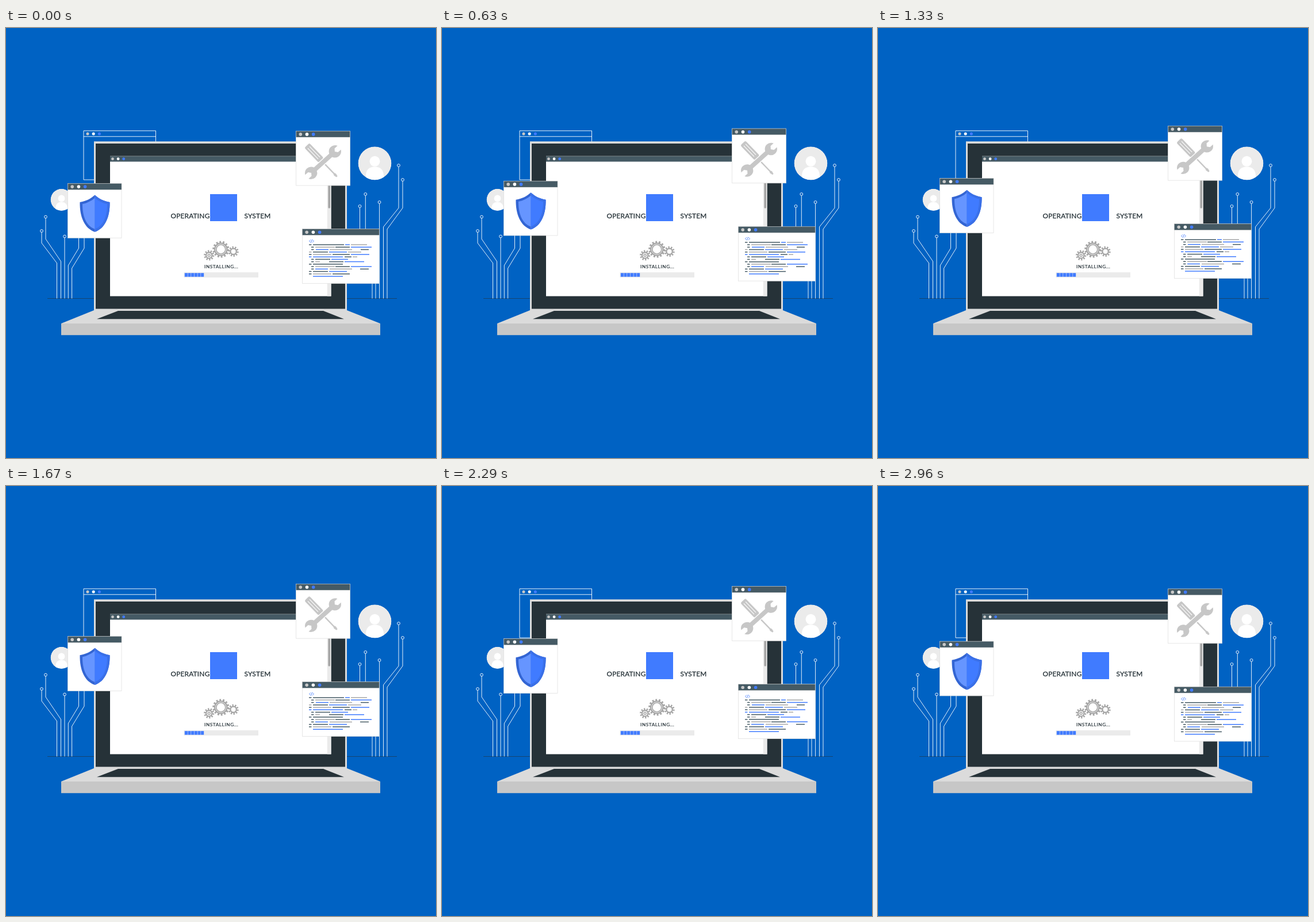
An HTML page for the animation above (3 s loop, 748 by 748 pixels).

```html
<!DOCTYPE html>
<html lang="en">
<head>
<meta charset="utf-8">
<title>Installing</title>
<style>
html, body { margin: 0; width: 100%; height: 100%; overflow: hidden; background: #0062c3; }
svg { display: block; width: 748px; height: 748px; }
text { font-family: Lato, sans-serif; fill: #263238; }
.line { fill: none; stroke: #fff; stroke-width: .9; }
</style>
</head>
<body>
<svg viewBox="0 0 748 748">
  <defs>
    <clipPath id="face"><circle r="29"/></clipPath>
    <g id="avatar" clip-path="url(#face)">
      <circle r="29" fill="#ebebeb"/>
      <circle cy="-3.5" r="9" fill="#fff"/>
      <path d="M-15.5 32V22C-15.5 11-9 6 0 6S15.5 11 15.5 22V32Z" fill="#fff"/>
    </g>
    <g id="dots"><circle r="1" fill="#c7c7c7"/><circle cx="4" r="1" fill="#fff"/><circle cx="8" r="1" fill="#407bff"/></g>
  </defs>

  <path d="M72 470.5H680" stroke="#263238" stroke-width=".6"/>
  <g id="circuits" class="line"></g>
  <path class="line" stroke-width="1" d="M135 178.8H260.5V264H135ZM135 188.8H260.5"/>
  <use href="#dots" transform="translate(142 184) scale(2.55)"/>
  <use href="#avatar" x="641.5" y="235.3"/>
  <use href="#avatar" transform="translate(96.5 298.8) scale(.655)"/>

  <!-- laptop -->
  <path d="M153 197.3H593V491H153Z" fill="#dbdbdb"/>
  <path d="M156 201H590V488.5H156Z" fill="#263238"/>
  <path d="M153 491H593L651 514H96Z" fill="#dbdbdb"/>
  <path d="M96 514H651V534.3H96Z" fill="#c7c7c7"/>
  <path d="M195 492H552L588 506.2H158Z" fill="#263238"/>
  <path d="M181 223H565.5V466.5H181Z" fill="#fff"/>
  <path d="M181 223H565.5V232.5H181Z" fill="#455a64"/>
  <path d="M181 222.8H565.5" stroke="#c7c7c7" stroke-width=".5"/>
  <use href="#dots" transform="translate(185.5 227.7) scale(2.4)"/>
  <path d="M558.8 232.5H565.5V466.5H558.8Z" fill="#ebebeb"/>
  <path d="M562.2 240V312" stroke="#a6a6a6" stroke-width="3.6" stroke-linecap="round"/>

  <!-- screen content -->
  <rect x="355" y="289" width="47" height="47" fill="#407bff"/>
  <g font-size="11.8" letter-spacing=".25" style="stroke:#263238;stroke-width:.3">
    <text x="354.5" y="331" text-anchor="end">OPERATING</text>
    <text x="414.5" y="331">SYSTEM</text>
  </g>
  <text x="345" y="417.8" font-size="8.2" letter-spacing=".6" style="stroke:#263238;stroke-width:.2">INSTALLING...</text>
  <g id="gears"></g>
  <path d="M309.5 425H439V434H309.5Z" fill="#ebebeb"/>
  <path d="M310.8 429.5H344.2" stroke="#407bff" stroke-width="6.6" stroke-dasharray="5.1 .56"/>

  <!-- floating windows -->
  <g id="float">
    <g id="frames"></g>

    <g transform="translate(551.5 233.5)" fill="#c7c7c7">
      <g transform="rotate(46)">
        <path d="M-38-6H-7Q-2-4 0-1.5V1.5Q-2 4-7 6H-38Q-40.500 6-40.500 3.500V-3.500Q-40.500-6-38-6Z"/>
        <path d="M-36-2.200H-10M-36 2.200H-10" stroke="#fff" stroke-width="1.100"/>
        <path d="M-3-1.200H27L30-2.400 35-1.200V1.200L30 2.400 27 1.200H-3Z"/>
      </g>
      <g transform="rotate(-42)">
        <path d="M-21 0H21" stroke="#fff" stroke-width="10.500"/>
        <path d="M-23 0H23" stroke="#c7c7c7" stroke-width="7.800"/>
        <circle cx="-28" r="10.700"/>
        <circle cx="28" r="10.700"/>
        <path d="M-41-4.500H-31L-27.500 0-31 4.500H-41ZM41-4.500H31L27.500 0 31 4.500H41Z" fill="#fff"/>
      </g>
    </g>

    <g transform="translate(154.5 290.5)">
      <path id="half" d="M0 0C-7 6.500-16 11-26 12.500C-26.500 38-18 58 0 64.300Z" fill="#3365d3"/>
      <use href="#half" transform="scale(-1 1)"/>
      <path d="M0 0C7 6.500 16 11 26 12.500C26.500 38 18 58 0 64.300Z" fill="#3a70e8"/>
      <path d="M0 5.200C-6.500 10.500-13 14-21.500 15.800C-21.500 37-15 54-0 59.300Z" fill="#6695ff"/>
      <path d="M0 5.200C6.500 10.500 13 14 21.500 15.800C21.500 37 15 54 0 59.300Z" fill="#407bff"/>
    </g>

    <path d="M530 368.300L527.500 370.700 530 373.100M533 368.300L535.500 370.700 533 373.100M532.200 367.800L530.800 373.600" fill="none" stroke="#407bff" stroke-width=".8"/>
    <g id="code"></g>
  </g>
</svg>

<script>
const byId = id => document.getElementById(id);

// Each trace starts at its hollow node.
byId("circuits").innerHTML = [
  [62, 353, "V374L88.5 409V470.5"],
  [69, 328.5, "V367L95.5 406V470.5"],
  [102, 362.5, "V470.5"],
  [126.5, 345, "V383L108.3 413V470.5"],
  [136, 340, "V383L114.6 418V470.5"],
  [683, 239, "V313L656.5 346V470.5"],
  [690, 264, "V313L663 350V470.5"],
  [625.3, 289, "V390L643 420V470.5"],
  [615.5, 310, "V390L637 424V470.5"],
  [649.6, 303, "V470.5"]
].map(([x, y, path]) => `<circle cx="${x}" cy="${y}" r="2.4"/><path d="M${x} ${y + 2.4}${path}"/>`).join("");

function gear(x, y, r, teeth, hole) {
  const step = 2 * Math.PI * (r - 1) / teeth;
  return `<g transform="translate(${x} ${y})" fill="none" stroke="#a6a6a6">
    <circle r="${r - 1}" stroke-width="3.6" stroke-dasharray="${step * .5} ${step * .5}"/>
    <circle r="${(r - 2 + hole) / 2}" stroke-width="${r - 2 - hole}"/></g>`;
}
byId("gears").innerHTML =
  gear(373.8, 385, 13.8, 14, 7.2) +
  '<circle cx="373.8" cy="385" r="9.2" fill="none" stroke="#fff" stroke-width=".8"/>' +
  gear(353.2, 395.4, 8.3, 10, 4) + 
  '<circle cx="353.2" cy="395.4" r="2" fill="none" stroke="#a6a6a6" stroke-width="1.5"/>' +
  gear(395.6, 388.8, 8.3, 10, 4);

const panel = (x, y, w) => `
  <rect x="${x}" y="${y}" width="${w}" height="94.7" fill="#fff" stroke="#e0e0e0" stroke-width=".8"/>
  <rect x="${x}" y="${y}" width="${w}" height="10.7" fill="#455a64" stroke="#c7c7c7" stroke-width=".4"/>
  <use href="#dots" transform="translate(${x + 7.7} ${y + 5.6}) scale(2.8)"/>`;
byId("frames").innerHTML = panel(504.6, 179.3, 93.8) + panel(107.5, 270.5, 93.5) + panel(515.5, 349.6, 133.7);

// Rows of strokes: colour letter, start and end; the first letter is the short lead.
const inks = { d: "#455a64", g: "#a6a6a6", b: "#407bff" };
const rows = [
  "d527 d534-588 b590-598 g600-628",
  "d531 g538-572 d573-598 b600-636",
  "d531 b539-561 g563-602 d617-631",
  "g527 d534-560 b562-593 g595-618",
  "d527 g534-566 d568-598 b600-632",
  "b527 b534-586 d589-601 g603-611",
  "d531 d538-564 b566-595",
  "d531 g538-546 d562-587 b589-623",
  "d527 d534-586",
  "d531 g538-572 d573-598 b600-636",
  "d531 b538-560 g563-602 d616-631",
  "d527 d534-560 b562-593",
  "d527 g534-566 d568-598",
  "b534-586"
];
byId("code").innerHTML = rows.map((row, i) => row.split(" ").map(part => {
  const [from, to = +from + 4.5] = part.slice(1).split("-");
  return `<path d="M${from} ${377 + i * 4.23}H${to}" stroke="${inks[part[0]]}" stroke-width="1.5"/>`;
}).join("")).join("");

const loop = 3000, rise = 10;
const start = performance.now();
function draw(now) {
  const phase = Math.max(0, now - start) % loop / loop;
  const lift = rise * (1 - Math.abs(1 - 2 * phase));
  byId("float").setAttribute("transform", `translate(0 ${-lift})`);
  requestAnimationFrame(draw);
}
draw(start);
</script>
</body>
</html>
```
